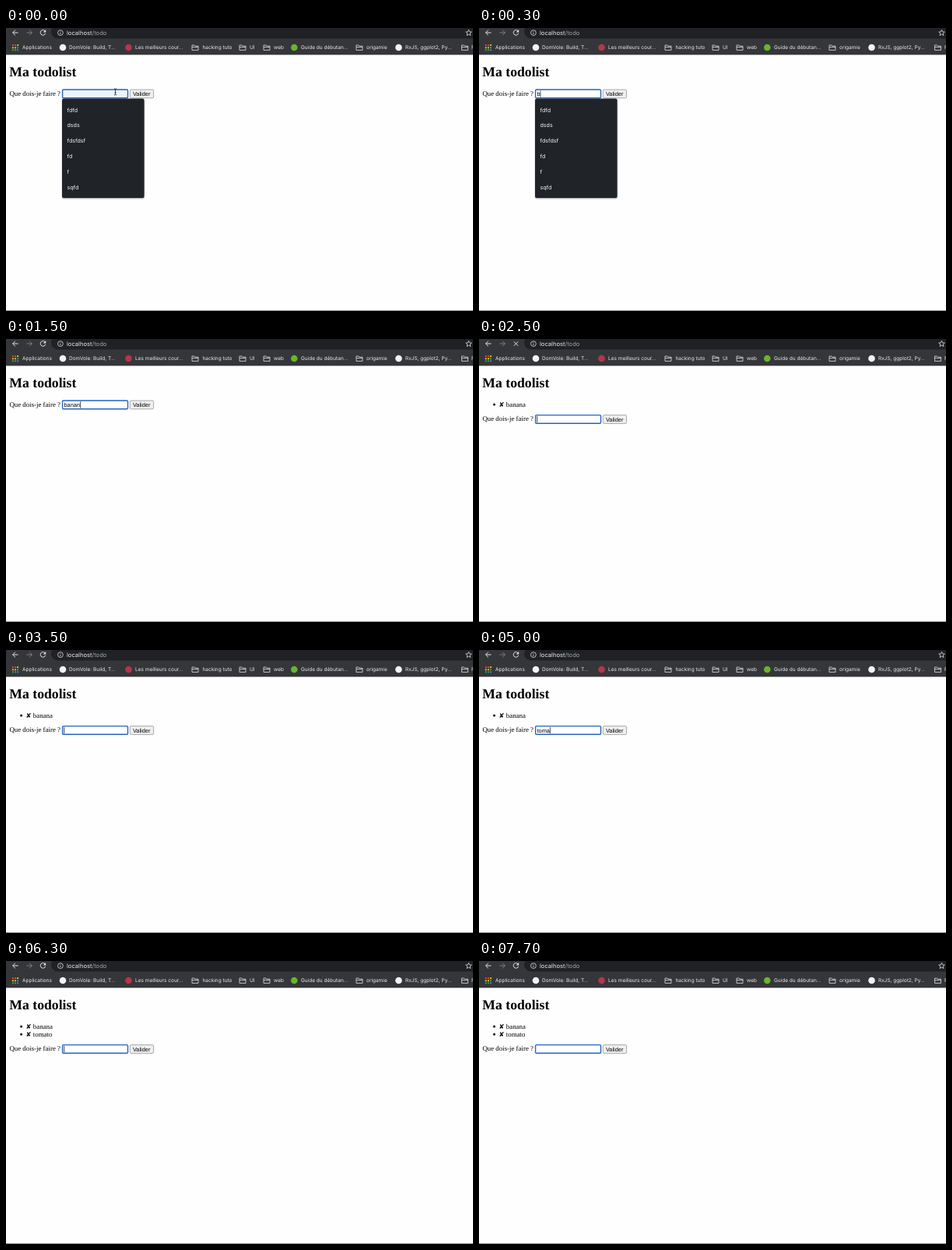
Animation of 600x363 px, one loop 8 s. Source, as an HTML page:

```html
<!DOCTYPE html>
<html lang="fr">
<head>
<meta charset="utf-8">
<title>Ma todolist</title>
<style>
  html, body { margin: 0; width: 100%; height: 100%; overflow: hidden; background: #fefefe; }
  svg { display: block; width: 100vw; height: 100vh; }
  text { text-rendering: geometricPrecision; white-space: pre; }
  .ui { font-family: Inter, Roboto, sans-serif; fill: #e8eaed; }
  .bookmark { font-size: 6.5px; }
  .url { font-size: 7.6px; }
  .option { font-size: 7.1px; fill: #f1f3f4; }
  .page { font: 8.85px "Liberation Serif", serif; }
  .heading { font: bold 17.7px "Liberation Serif", serif; }
  .control { font: 7.37px "Liberation Sans", sans-serif; }
  .cross { font: 8.4px "DejaVu Sans", sans-serif; }
  .line { fill: none; stroke: #dfe1e5; stroke-width: 1; }
</style>
</head>
<body>
<svg viewBox="0 0 600 363">
  <rect width="600" height="363" fill="#fefefe"/>

  <g id="chrome">
    <rect width="600" height="34.4" fill="#35363a"/>
    <rect x="58" y="-4" width="560" height="17.4" rx="8.5" fill="#202124"/>
    <path class="line" d="M15.6 6H8.6M12 2.6L8.6 6L12 9.4"/>
    <path class="line" d="M26.4 6H33.4M30 2.6L33.4 6L30 9.4" stroke-opacity=".4"/>
    <g id="reload">
      <path class="line" d="M50 3.7A3.3 3.3 0 1 0 50.7 6.8"/>
      <path d="M51.2 2V5.4H47.8Z" fill="#dfe1e5"/>
    </g>
    <path id="stop" class="line" d="M44.7 3.2L50.3 8.8M50.3 3.2L44.7 8.8"/>
    <circle class="line" cx="69.9" cy="6.1" r="3.4" style="stroke-width:.8"/>
    <path class="line" d="M69.9 5.6V8M69.9 4.1V4.9" style="stroke-width:.8"/>
    <text class="ui url" x="78" y="8.8">localhost<tspan fill="#9aa0a6">/todo</tspan></text>
    <path id="star" class="line" style="stroke-width:.8"/>
  </g>

  <text class="heading" x="4.3" y="62">Ma todolist</text>
  <g id="list"></g>

  <g id="form">
    <text class="page" x="4.4" y="86.9">Que dois-je faire ?</text>
    <rect id="field" x="72.6" y="79" width="83.9" height="10.7" rx="1.2" stroke="#2266c4" stroke-width="1.4"/>
    <text id="typed" class="control" x="74.5" y="87"></text>
    <rect id="caret" y="80.3" width=".7" height="8.3"/>
    <rect x="159.3" y="79" width="30.3" height="10.8" rx="1.6" fill="#efefef" stroke="#767676" stroke-width=".6"/>
    <text class="control" x="163" y="87">Valider</text>
  </g>

  <g id="popup">
    <rect x="71.6" y="91.5" width="106.6" height="128" rx="2.4" fill="#000" opacity=".22"/>
    <rect x="72" y="90.6" width="105.6" height="127.4" rx="2.2" fill="#202328"/>
  </g>
  <path id="pointer" d="M138.9 77.7Q140.5 77.7 140.5 79V84.6Q140.5 85.9 138.9 85.9M142.1 77.7Q140.5 77.7 140.5 79M140.5 84.6Q140.5 85.9 142.1 85.9M139.4 83H141.6" fill="none" stroke="#222" stroke-width=".8"/>
  <rect y="362" width="600" height="1" fill="#8c8c8c"/>
</svg>

<script>
const LOOP = 8000;
const $ = id => document.getElementById(id);

function add(parent, tag, attrs, text = "") {
  const node = document.createElementNS("http://www.w3.org/2000/svg", tag);
  for (const key in attrs) node.setAttribute(key, attrs[key]);
  node.textContent = text;
  return parent.appendChild(node);
}

const show = (node, on) => node.setAttribute("visibility", on ? "visible" : "hidden");

// Bookmark bar: icon kind, icon centre, label start, label
const bookmarks = [
  ["apps", 12, 21, "Applications"],
  ["#f1f3f4", 73, 81, "DomVole: Build, T..."],
  ["#b5364a", 157.5, 166, "Les meilleurs cour..."],
  ["folder", 243, 252.5, "hacking tuto"],
  ["folder", 304, 313, "UI"],
  ["folder", 335, 344, "web"],
  ["#69b52c", 370.3, 379, "Guide du débutan..."],
  ["folder", 454, 463, "origamie"],
  ["#f1f3f4", 504.5, 513, "RxJS, ggplot2, Py..."],
  ["folder", 589.5, 598, "F"],
];
const dotColors = ["#ea4335", "#fbbc04", "#34a853", "#4285f4"];

for (const [kind, cx, x, label] of bookmarks) {
  const bar = $("chrome");
  if (kind === "apps") {
    for (let i = 0; i < 9; i++) {
      const col = i % 3, row = (i - col) / 3;
      add(bar, "rect", { x: cx - 4.1 + col * 3.1, y: 21.1 + row * 3.1, width: 2, height: 2, rx: .5,
        fill: dotColors[(row + (col >> 1)) % 4] });
    }
  } else if (kind === "folder") {
    add(bar, "path", { class: "line", style: "stroke-width:.8",
      d: `M${cx - 4} 22H${cx - 1}L${cx} 23.2H${cx + 4}V28.4H${cx - 4}ZM${cx - 4} 24.6H${cx + 4}` });
  } else {
    add(bar, "circle", { cx, cy: 25, r: 4.3, fill: kind });
  }
  add(bar, "text", { class: "ui bookmark", x, y: 27.2 }, label);
}

const starPoints = Array.from({ length: 10 }, (_, i) => {
  const r = i % 2 ? 1.8 : 4, a = i * Math.PI / 5;
  return `${594.5 + r * Math.sin(a)} ${6.3 - r * Math.cos(a)}`;
});
$("star").setAttribute("d", `M${starPoints.join("L")}Z`);

["fdfd", "dsds", "fdsfdsf", "fd", "f", "sqfd"].forEach((word, i) =>
  add($("popup"), "text", { class: "ui option", x: 78.5, y: 107.5 + i * 19.9 }, word));

const items = ["banana", "tomato"].map((word, i) => {
  const item = add($("list"), "g", { transform: `translate(0 ${i * 10})` });
  add(item, "circle", { cx: 19.6, cy: 83.9, r: 1.5 });
  add(item, "text", { class: "cross", x: 25.6, y: 86.5 }, "✘");
  add(item, "text", { class: "page", x: 34.8, y: 86.5 }, word);
  return item;
});

// Each step changes some of the state and keeps the rest.
const steps = [
  [0, { text: "", caret: false, count: 0, loading: false, popup: true, pointer: true }],
  [300, { text: "b", caret: true, pointer: false }],
  [400, { popup: false }],
  [500, { text: "ba" }],
  [700, { text: "ban" }],
  [1200, { caret: false }],
  [1300, { text: "bana", caret: true }],
  [1500, { text: "banan" }],
  [2000, { caret: false }],
  [2100, { text: "banana", caret: true }],
  [2400, { loading: true }],
  [2500, { text: "", count: 1 }],
  [2600, { loading: false }],
  [3000, { caret: false }],
  [3500, { caret: true }],
  [4000, { caret: false }],
  [4100, { text: "t", caret: true }],
  [4600, { caret: false }],
  [4700, { text: "to", caret: true }],
  [4800, { text: "tom" }],
  [5000, { text: "toma" }],
  [5200, { text: "tomat" }],
  [5400, { text: "tomato" }],
  [5900, { caret: false }],
  [6100, { loading: true }],
  [6200, { text: "", caret: true, count: 2 }],
  [6300, { loading: false }],
  [6700, { caret: false }],
  [7200, { caret: true }],
  [7700, { caret: false }],
];
const formShift = [0, 18.6, 28.6];

function draw(time) {
  const state = Object.assign({}, ...steps.filter(([at]) => at <= time).map(([, change]) => change));
  const typed = $("typed");
  typed.textContent = state.text;
  const width = state.text ? typed.getComputedTextLength() : 0;
  $("caret").setAttribute("x", 74.5 + width);
  $("field").setAttribute("fill", state.pointer ? "#edf4fd" : "#fff");
  $("form").setAttribute("transform", `translate(0 ${formShift[state.count]})`);
  items.forEach((item, i) => show(item, i < state.count));
  show($("caret"), state.caret);
  show($("popup"), state.popup);
  show($("pointer"), state.pointer);
  show($("reload"), !state.loading);
  show($("stop"), state.loading);
}

const start = performance.now();
function tick() {
  draw((performance.now() - start) % LOOP);
  requestAnimationFrame(tick);
}
tick();
</script>
</body>
</html>
```
